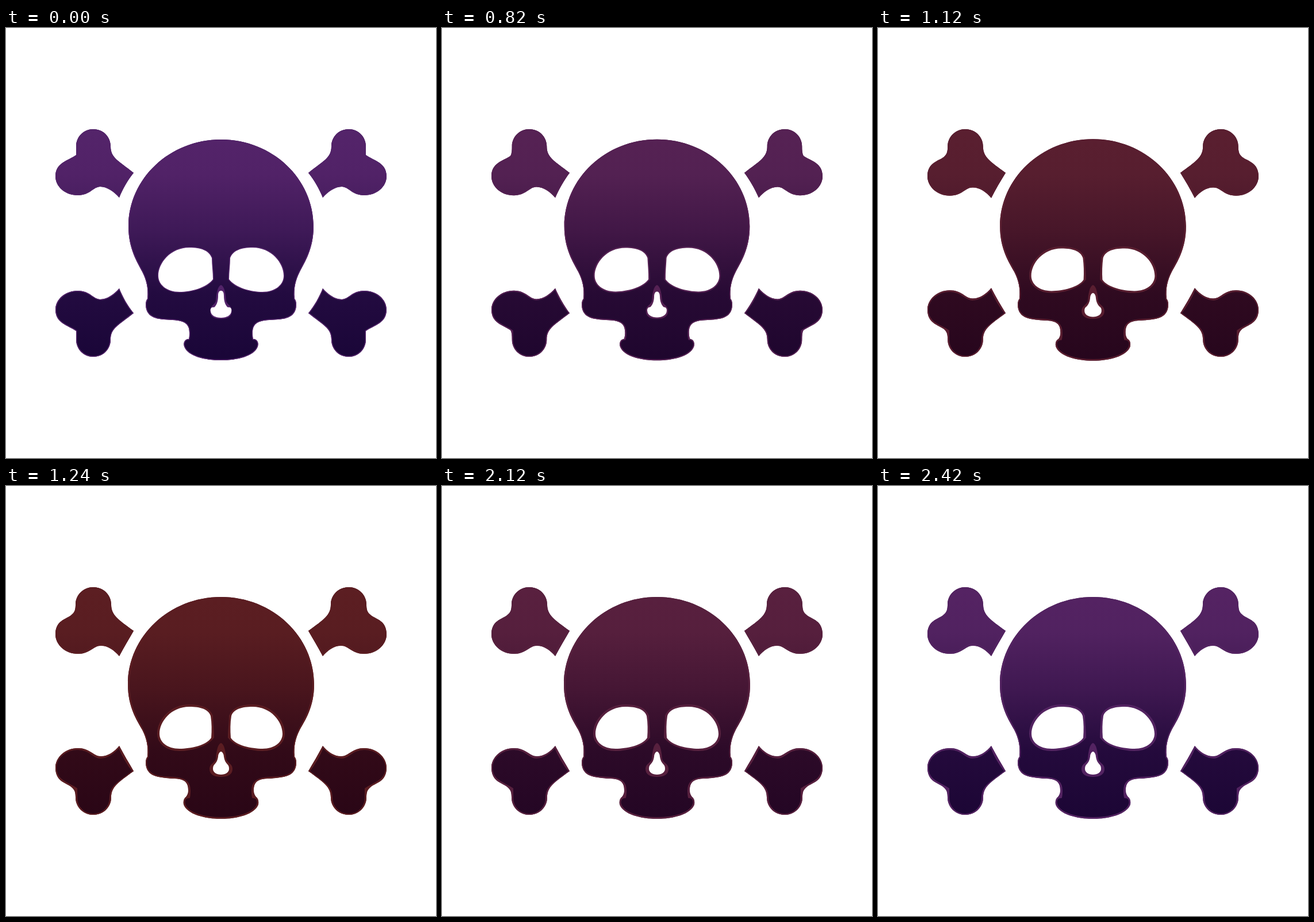
Write an HTML page with a canvas that moves like this. It is 748 by 748 pixels and loops after 2480 ms.

```html
<!DOCTYPE html>
<html lang="en">
<head>
<meta charset="utf-8">
<title>Skull and bones</title>
<style>
  html, body { margin: 0; width: 100%; height: 100%; overflow: hidden; background: #fff; }
  canvas { display: block; }
</style>
</head>
<body>
<canvas id="stage" width="748" height="748"></canvas>
<script>
const SIZE = 748, LOOP = 2480;
const ctx = document.getElementById('stage').getContext('2d');

// Left-side outlines; "a>b" is a coordinate that moves from a to b.
const SKULL = `M374 194>193 C285>284 194>193 213>212 262 213>212 345
  C213>212 385 229>228 408 237 424 C244 438 248 452 246 471
  C242 476 242 486 246 494 C253 506 268 507 290 508>509
  C312 509 319>317 516 319>317 530 C319>317 534 319>315 538 318>313 541
  C311>310 541>543 308 547 310>309 554 C316>315 571 346 578>579 374 578>579`;
const BONE = `M222 252 C212>214 264>266 203>205 280>281 197 295>296
  C188 285 176 276>277 164 276>278 C152 276>278 146 291>292 125 291>292
  C103 291>292 86 276 86 258 C86 234 108>104 231>232 122>113 221>225
  C122>120 217>219 122>121 212>214 122>121 206 C122>121 189 135 176 152 176
  C170 176 182>183 190 182>183 206 C182>183 226>224 196>194 231>232 222 252 Z`;
const EYE = `M319 382>384 C339>338 382>384 353>352 387>388 358>356 400
  C358 412 360>358 425 360>357 437>438 C349 452>451 321 459>457 302 459>457
  C279>280 459>457 265>267 446>445 265>267 431 C265>267 409>410 286>287 382>384 319 382>384 Z`;
const NOSE = `M374 457>462 C370>372 457>462 369 461>466 369 466>471
  C369>368 476>477 366 483>481 362>363 486>484 C357>361 485>486 355>360 489>488 356>360 493>492
  C357>360 500>498 364>366 504>502 374 504>502`;
const NOSE_RIM = `M374 447 C368 449 366 462 365 475
  C363 482 355>354 483 355>354 492 C355>354 502 362 506 374 506`;

const mix = (a, b, k) => a + (b - a) * k;
const rgb = (a, b, k) => `rgb(${a.map((v, i) => Math.round(mix(v, b[i], k)))})`;

function shape(data, k) {
  const half = new Path2D(data.replace(/(\d+)>(\d+)/g, (_, a, b) => mix(+a, +b, k)));
  const both = new Path2D(half);
  both.addPath(half, new DOMMatrix([-1, 0, 0, 1, SIZE, 0]));
  return both;
}

function figure(k) {
  const all = shape(SKULL, k), bones = shape(BONE, k);
  all.addPath(bones);
  all.addPath(bones, new DOMMatrix([1, 0, 0, -1, 0, SIZE]));
  return all;
}

function fill(path, color) {
  ctx.fillStyle = color;
  ctx.fill(path);
}

function draw(grow, tint) {
  const light = [mix(84, 92, tint), mix(36, 30, tint), mix(106, 34, tint)];
  const dark = [mix(26, 42, tint), 6, mix(56, 22, tint)];
  const rim = rgb(light, dark, 0.03);
  const shade = ctx.createLinearGradient(0, 176, 0, 572);
  for (const [at, depth] of [[0, 0], [0.2, 0.06], [0.45, 0.38], [0.72, 0.85], [1, 1]])
    shade.addColorStop(at, rgb(light, dark, depth));

  fill(new Path2D(`M0 0H${SIZE}V${SIZE}H0Z`), '#fff');
  ctx.strokeStyle = rim;
  ctx.lineWidth = mix(3, 4, grow);

  ctx.save();
  ctx.clip(figure(grow));
  const base = figure(0);
  fill(new Path2D(`M0 0H${SIZE}V${SIZE}H0Z`), rim);
  fill(base, shade);
  ctx.stroke(base);
  ctx.restore();

  const socket = shape(EYE, 0);
  ctx.stroke(socket);
  fill(socket, rim);
  fill(shape(EYE, grow), '#fff');
  fill(shape(NOSE_RIM, grow), rim);
  fill(shape(NOSE, grow), '#fff');
}

// The tint rises in even steps and falls back in uneven ones.
function pose(t) {
  if (t < 700) return [0, 0];
  if (t < 1240) {
    const k = (Math.floor((t - 700) / 60) + 1) / 10;
    return [k, k];
  }
  const tint = t < 1940 ? 1 : t < 2120 ? 0.9 : t < 2300 ? 0.6 : t < 2420 ? 0.3 : 0.1;
  return [1, tint];
}

const start = performance.now();
function tick() {
  draw(...pose((performance.now() - start) % LOOP));
  requestAnimationFrame(tick);
}
tick();
</script>
</body>
</html>
```
